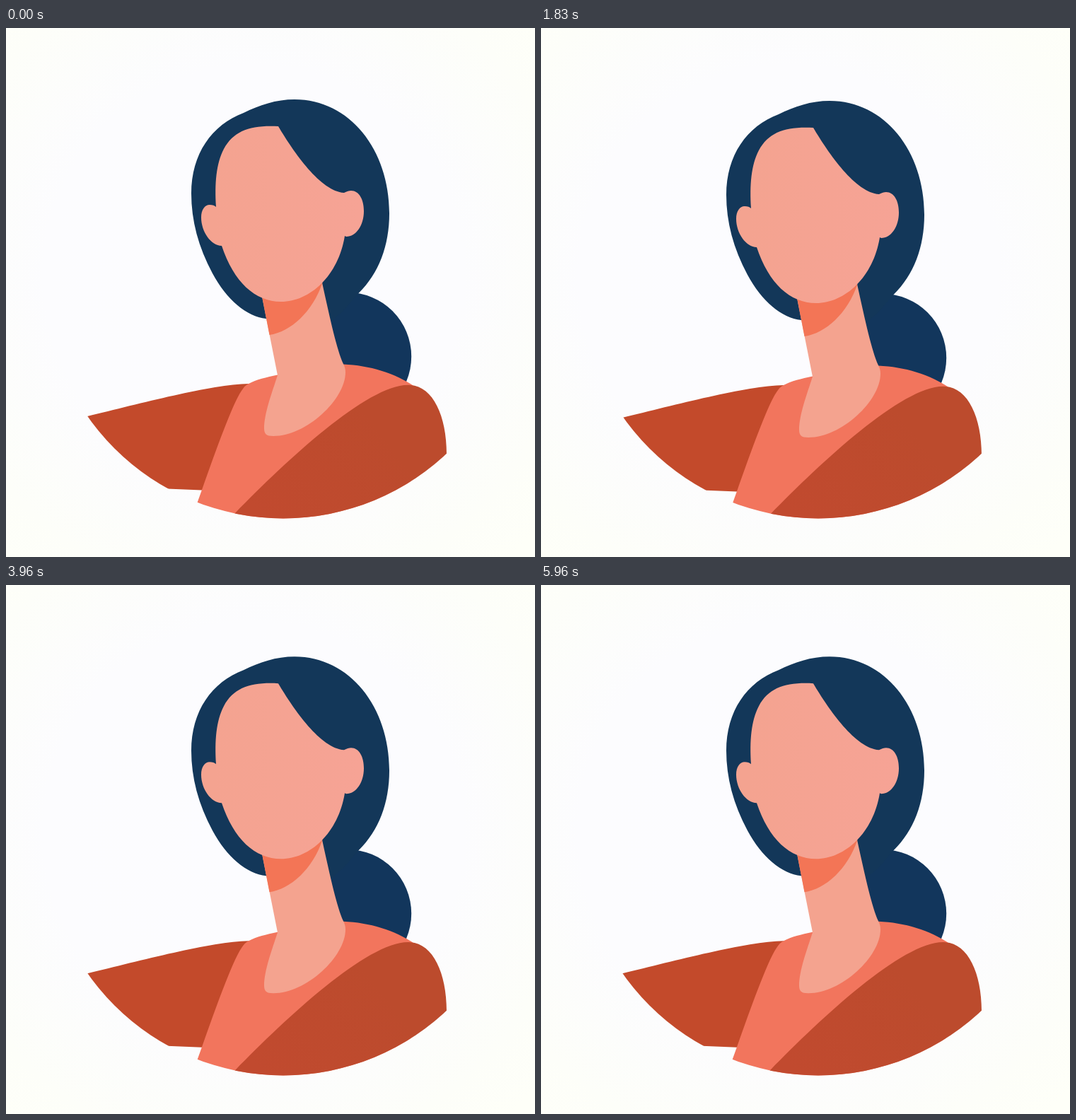
Recreate the animation shown at these times as an HTML page with a canvas. Size 748x748 px, loop 6000 ms.

```html
<!DOCTYPE html>
<html lang="en">
<head>
<meta charset="utf-8">
<title>Portrait</title>
<style>
  html, body { margin: 0; width: 100%; height: 100%; overflow: hidden; background: #fcfcfe; }
  canvas { display: block; width: 100vw; height: 100vh; }
</style>
</head>
<body>
<canvas id="stage" width="748" height="748"></canvas>
<script>
const SIZE = 748;
const LOOP = 6000;
const FRAME = 1000 / 24;
const BOB = { height: 30, period: 2000 };
const DISC = { x: 392, y: 356, r: 337.4 };

const ctx = document.getElementById('stage').getContext('2d');

function blend(x0, y0, x1, y1, from, to) {
  const g = ctx.createLinearGradient(x0, y0, x1, y1);
  g.addColorStop(0, from);
  g.addColorStop(1, to);
  return g;
}

function backdrop() {
  const g = ctx.createRadialGradient(350, 350, 0, 350, 350, 540);
  g.addColorStop(0, '#fcfcff');
  g.addColorStop(0.55, '#fcfcfe');
  g.addColorStop(0.85, '#fdfef9');
  g.addColorStop(1, '#fefff8');
  return g;
}

const shape = (d, fill) => ({ path: new Path2D(d), fill });

const bun = new Path2D();
bun.arc(482.5, 464.5, 90.7, 0, Math.PI * 2);

const head = {
  bun: { path: bun, fill: '#12365c' },
  hair: shape(
    'M336 120 C358 109 382 101 408 101 C486 101 542 172 542 262 ' +
    'C542 308 527 347 499 374.5 L477 400 L430 440 L368 411 ' +
    'C340 408 312 384 292 347 C272 310 262 272 262 234 C262 178 291 137 336 120 Z',
    '#133759'),
  neck: shape(
    'M358 360 L384 491 C376 516 365 545 365 566 C365 574 368 577 378 577 ' +
    'C425 577 480 525 480 487 C480 482 479 479 477 475 C468 455 459 415 447 360 Z',
    '#f4a38f'),
  shade: shape(
    'M358 362 L362.5 382 L372.5 434 C402 430 434 401 447.5 360 Z',
    '#f37556'),
  face: shape(
    'M385 139 C407 176 445 231 478 233 C482 231 485 230 488 230 ' +
    'C499 230 506 242 506 259 C506 279 495 295 481 295 L479 294 ' +
    'C470 350 430 387 389 387 C352 387 322 359 305 308 ' +
    'C290 308 276 288 276 268 C276 257 281 250 288 250 C292 250 295 251 297 253 ' +
    'C295 220 297 192 308 171 C322 145 346 137 385 139 Z',
    blend(290, 260, 500, 260, '#f4a390', '#f6a395'))
};

const body = [
  // far sleeve
  shape(
    'M50 565 L115 549 C190 531 290 504 343 503 L360 520 L300 654.5 L277 653.5 L228 651.5 L80 645.5 Z',
    '#c34a2b'),
  // top
  shape(
    'M343 503 C354 497 368 494 384 490.5 L430 485 L477 475.5 C514 477 550 488 578 507 ' +
    'L590 530 L560 720 L253 720 L277 653 C296 599 320 532 333 513 Q338 505 343 503 Z',
    '#f2755d'),
  // near sleeve
  shape(
    'M300 709 L324 686 C398 610 516 500 572 505 C604 507 623 549 623 602 L623 730 L300 730 Z',
    blend(360, 690, 520, 560, '#c14a2f', '#bc4b2d'))
];

const sky = backdrop();

function paint({ path, fill }) {
  ctx.fillStyle = fill;
  ctx.fill(path);
}

function draw(t) {
  const dy = BOB.height * (1 - Math.cos(2 * Math.PI * t / BOB.period)) / 2;

  ctx.fillStyle = sky;
  ctx.fillRect(0, 0, SIZE, SIZE);

  ctx.save();
  ctx.translate(0, dy);
  paint(head.bun);
  paint(head.hair);
  ctx.restore();

  // the disc stays still while the clothes move behind it
  ctx.save();
  ctx.beginPath();
  ctx.arc(DISC.x, DISC.y, DISC.r, 0, Math.PI * 2);
  ctx.clip();
  ctx.translate(0, dy);
  body.forEach(paint);
  ctx.restore();

  ctx.save();
  ctx.translate(0, dy);
  paint(head.neck);
  paint(head.shade);
  paint(head.face);
  ctx.restore();
}

const start = performance.now();

function tick(now) {
  const t = Math.max(0, now - start) % LOOP;
  const step = Math.floor((t + 4.9) / FRAME);
  draw(step * FRAME);
  requestAnimationFrame(tick);
}

draw(0);
requestAnimationFrame(tick);
</script>
</body>
</html>
```
